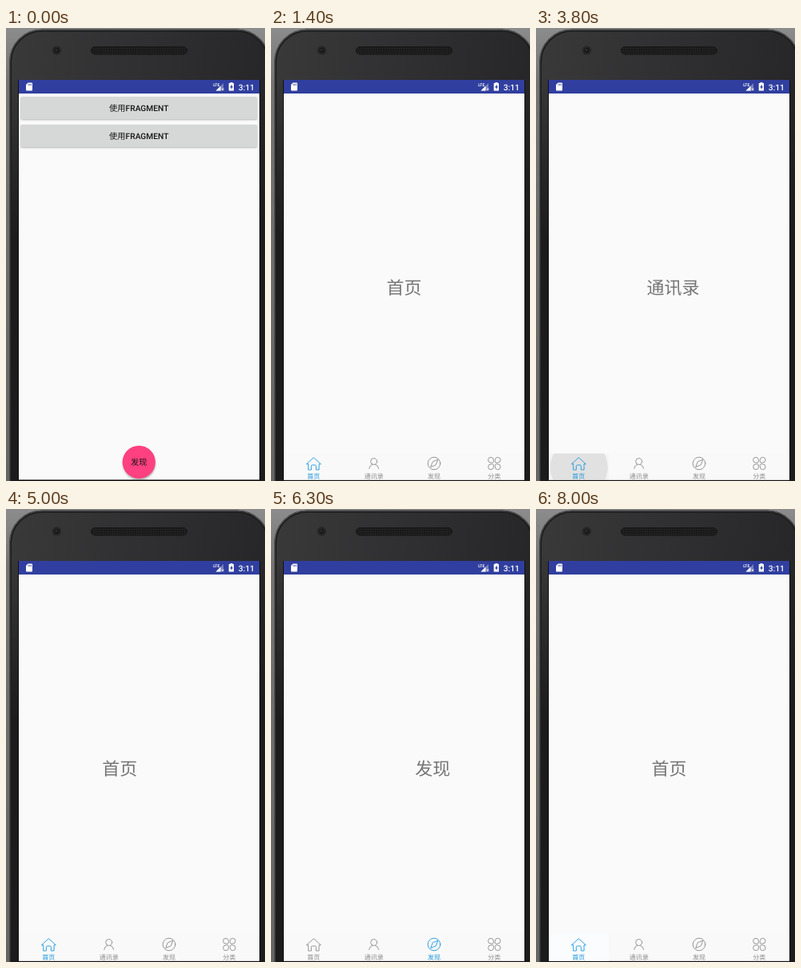
An HTML page for the animation above (8.6 s loop, 324 by 567 pixels).

```html
<!DOCTYPE html>
<html lang="zh-CN">
<head>
<meta charset="utf-8">
<title>Tab pager</title>
<style>
html, body { margin: 0; width: 100%; height: 100%; overflow: hidden; background: #8a8a8a; }
svg { display: block; width: 100%; height: 100%; }
text {
  font-family: Roboto, "Noto Sans CJK SC", "Noto Sans CJK", sans-serif;
  text-anchor: middle; text-rendering: geometricPrecision;
}
.title { font-size: 21.97px; fill: #757575; }
.tab { color: #8c8c8c; }
.tab.on { color: #1f97dc; }
.tab text { font-size: 8.05px; fill: currentColor; }
.tab path, .tab circle { fill: none; stroke: currentColor; stroke-width: .9; stroke-linejoin: round; stroke-linecap: round; }
.button { font-size: 10.25px; fill: #161616; }
.button tspan { font-weight: 500; }
</style>
</head>
<body>
<svg viewBox="0 0 324 567">
  <defs>
    <linearGradient id="backdrop" x2="0" y2="1">
      <stop offset="0" stop-color="#8c8c8c"/><stop offset=".12" stop-color="#737473"/><stop offset="1" stop-color="#646664"/>
    </linearGradient>
    <linearGradient id="body" x2="1" y2=".35">
      <stop offset="0" stop-color="#39393a"/><stop offset=".5" stop-color="#2f2f31"/><stop offset="1" stop-color="#252527"/>
    </linearGradient>
    <linearGradient id="side" x2="0" y2="1">
      <stop offset="0" stop-color="#1c1c1c" stop-opacity="0"/><stop offset=".4" stop-color="#1c1c1c"/>
    </linearGradient>
    <pattern id="mesh" width="3" height="3" patternUnits="userSpaceOnUse">
      <rect width="3" height="3" fill="#191919"/><circle cx="1.5" cy="1.5" r=".8" fill="#2c2c2d"/>
    </pattern>
    <filter id="blur" x="-20%" y="-50%" width="140%" height="200%"><feGaussianBlur stdDeviation="1"/></filter>
    <clipPath id="content"><path d="M16 82H317V565.400H16Z"/></clipPath>
    <clipPath id="press"><rect x="18.500" y="121" width="295.500" height="28" rx="1.500"/></clipPath>
    <clipPath id="cell"><rect id="cellBox" y="532.500" width="75.300" height="33.500"/></clipPath>
  </defs>

  <rect width="324" height="567" fill="url(#backdrop)"/>
  <rect x="4" y="1.500" width="326" height="640" rx="41" fill="#1b1b1b"/>
  <rect x="4.800" y="2.300" width="324.400" height="640" rx="40" fill="none" stroke="#525352" stroke-width="1.200"/>
  <rect x="7" y="4.500" width="320" height="640" rx="38" fill="url(#body)"/>
  <path d="M7 60H16V567H7ZM317 60H327V567H317Z" fill="url(#side)"/>
  <circle cx="63.500" cy="28" r="6" fill="#252526" stroke="#353536"/>
  <circle cx="63.500" cy="28" r="3" fill="#18181a"/>
  <circle cx="63" cy="27.500" r="1.200" fill="#343538"/>
  <rect x="106.500" y="23.500" width="120" height="9.500" rx="4.700" fill="url(#mesh)" stroke="#171717"/>

  <rect x="15" y="65" width="303" height="502" fill="#111"/>
  <rect x="16" y="65" width="301" height="500.400" fill="#fafafa"/>
  <rect x="16" y="65" width="301" height="17" fill="#303f9f"/>
  <g fill="#fff">
    <path d="M27.500 68.500H32.200Q33 68.500 33 69.300V77.500Q33 78.500 32 78.500H26Q25 78.500 25 77.500V71Z"/>
    <path d="M28 70V72M29.700 70V72M31.400 70V72" stroke="#303f9f" stroke-width=".8"/>
    <path d="M272 69V78.500H262.500Z" opacity=".35"/>
    <path d="M268.500 72.500V78.500H262.500Z"/>
    <path d="M270 75.300L272.500 78M272.500 75.300L270 78" stroke="#fff" stroke-width=".8"/>
    <text x="263.200" y="72.700" font-size="5" font-weight="700">LTE</text>
    <path d="M280.500 68H283.500V69H285V78.500H278.700V69H280.500Z"/>
    <path d="M282.700 70.500L280 74.500H281.700V77L284 73.300H282.700Z" fill="#303f9f"/>
    <text x="300.800" y="78" font-size="10.300" font-weight="500">3:11</text>
  </g>

  <g clip-path="url(#content)">
    <g id="menu">
      <rect id="shade" x="19" y="121.500" width="295" height="29" fill="#000" opacity="0" filter="url(#blur)"/>
      <g id="buttons"></g>
      <circle cx="166.500" cy="545.200" r="20.500" fill="#000" opacity=".3" filter="url(#blur)"/>
      <circle cx="166.300" cy="543.300" r="20.600" fill="#ff4081"/>
      <text x="166.300" y="547.200" font-size="10.250" fill="#161616">发现</text>
    </g>
    <g id="pager">
      <rect x="16" y="82" width="302" height="484" fill="#fafafa"/>
      <g id="pages"></g>
      <rect x="16" y="532" width="302" height="34" fill="#f9f9f9"/>
      <g id="ripples"></g>
      <g id="tabs"></g>
    </g>
  </g>
</svg>
<script>
const LOOP = 8600, STEP = 100, WIDTH = 301.3, LEFT = 15.7, CELL = WIDTH / 4;
const $ = id => document.getElementById(id);

const items = [
  ['首页', '<path d="M-7 .8H-9L0-7.300 9 .8H6.700V8H3V3.300Q3 2 1.800 2H-1.800Q-3 2-3 3.300V8H-6.700V.8"/>'],
  ['通讯录', '<circle cy="-2.500" r="4"/><path d="M-6 6.500Q-5.300 2.200-1.800 1.200M6 6.500Q5.300 2.200 1.800 1.200"/>'],
  ['发现', '<circle r="7.800"/><path d="M4.500-4.800L-1.700-2.200-4.300 4.600 1.900 2Z"/>'],
  ['分类', [0, 90, 180, 270].map(a =>
    `<path transform="rotate(${a})" d="M.9 2.300Q.9.900 2.300.900H4.300A3.400 3.400 0 1 1 .9 4.300Z"/>`).join('')]
];
const cellX = i => LEFT + CELL * i;

// Pager scrolls: start, duration, from, to, easing power
const scrolls = [
  [2395, 300, 0, 2, 5], [3095, 200, 2, 3, 5], [3720, 400, 3, 0, 5],
  [4200, 200, 0, .256, 1.300], [4400, 100, .256, 0, 1],
  [4935, 365, 0, .45, 1], [5300, 500, .45, 1, 3],
  [5830, 270, 1, 1.450, 1], [6100, 500, 1.450, 2, 3],
  [7030, 200, 2, 1, 5], [7530, 200, 1, 0, 5]
];
// Selected tab from each time on
const selections = [[0, 0], [2400, 2], [3100, 3], [3800, 0], [5400, 1], [6200, 2], [7100, 1], [7600, 0]];
// Tab touches: tab, start, fade, end, first radius
const touches = [
  [2, 2200, 2900, 3000, 12], [3, 2900, 3300, 3400, 16], [0, 3700, 4000, 4100, 20],
  [1, 7100, 7300, 7300, 28], [0, 7500, 7800, 8000, 22]
];

const buttonRow = (y, ripple = '') => `
  <rect x="18.500" y="${y + 1}" width="295.500" height="28" rx="1.500" fill="#000" opacity=".28" filter="url(#blur)"/>
  <rect x="18.500" y="${y}" width="295.500" height="28" rx="1.500" fill="#d6d7d7"/>${ripple}
  <text class="button" x="166.300" y="${y + 17.700}">使用<tspan>FRAGMENT</tspan></text>`;

$('buttons').innerHTML = buttonRow(86) + buttonRow(121,
  '<circle id="touch" cx="166" cy="135" r="0" fill="#000" opacity=".13" clip-path="url(#press)"/>');
$('pages').innerHTML = items.map(([name], i) =>
  `<text class="title" x="${166.400 + WIDTH * i}" y="332.500">${name}</text>`).join('');
$('tabs').innerHTML = items.map(([name, icon], i) => `
  <g class="tab" transform="translate(${cellX(i + .5)} 545)">${icon}<text y="18.500">${name}</text></g>`).join('');
$('ripples').innerHTML = `<g id="ripple" clip-path="url(#cell)">
  <rect id="tint" y="532.500" width="${CELL}" height="33.500"/>
  <circle id="wave" cy="550" r="0" opacity=".08"/></g>
  <rect id="rest" x="${LEFT}" y="532.500" width="${CELL}" height="33.500" fill="#fafcfe"/>`;
const tabs = [...$('tabs').children];

function set(id, attrs) {
  for (const key in attrs) $(id).setAttribute(key, attrs[key]);
}

function scrollAt(t) {
  const s = scrolls.filter(([start]) => t >= start).pop();
  if (!s) return 0;
  const [start, length, from, to, power] = s;
  const u = Math.min(1, (t - start) / length);
  return from + (to - from) * (1 - (1 - u) ** power);
}

function drawMenu(t) {
  const down = t >= 800;
  set('touch', { r: down ? 45 + (t - 800) * .4 : 0 });
  set('shade', { opacity: down ? .35 : 0 });
}

function drawRipple(t) {
  const hit = touches.find(([, start, , end]) => t >= start && t < end);
  set('ripple', { opacity: hit ? (t < hit[2] ? 1 : .4) : 0 });
  set('rest', { opacity: t >= 8000 ? 1 : 0 });
  if (!hit) return;
  const [tab, start, , , radius] = hit, x = cellX(tab);
  set('cellBox', { x });
  set('tint', { x, opacity: .02 });
  set('wave', { cx: x + CELL / 2 + .4, r: Math.min(60, radius + (t - start) * .16) });
}

function render(t) {
  drawMenu(t);
  const entering = t < 1400;
  set('menu', { visibility: entering ? 'visible' : 'hidden' });
  set('pager', {
    opacity: t < 1300 ? 0 : entering ? .6 : 1,
    transform: `translate(0 ${entering ? 14 : 0})`
  });
  set('pages', { transform: `translate(${-WIDTH * scrollAt(t)} 0)` });
  const active = selections.filter(([start]) => t >= start).pop()[1];
  tabs.forEach((tab, i) => tab.classList.toggle('on', i === active));
  drawRipple(t);
}

const origin = performance.now();
function tick() {
  const t = (performance.now() - origin) % LOOP;
  render(Math.floor(t / STEP) * STEP);
  requestAnimationFrame(tick);
}
tick();
</script>
</body>
</html>
```
